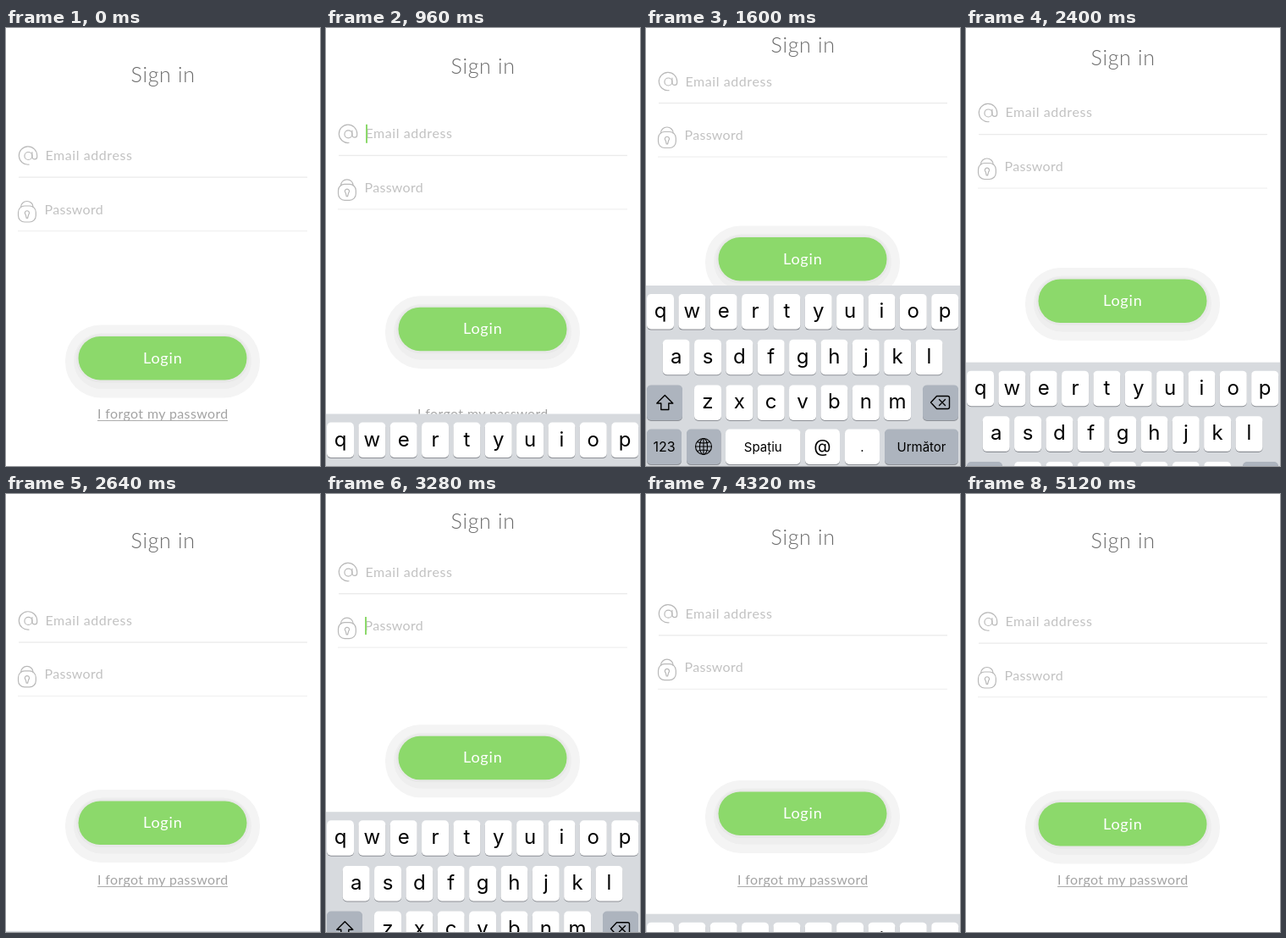
These frames come from a looping animation (371 by 517 pixels, 6000 ms). An HTML page:

```html
<!DOCTYPE html>
<html lang="en">
<head>
<meta charset="utf-8">
<title>Sign in</title>
<style>
  html, body { margin: 0; width: 100%; height: 100%; overflow: hidden; background: #fff; }
  svg { display: block; width: 371px; height: 517px; }
  text { font-family: Lato, "Open Sans", sans-serif; }
  .title { font-size: 25px; font-weight: 300; letter-spacing: .7px; fill: #6c6c6c; }
  .field text { font-size: 16px; fill: #c2c2c2; }
  .email { letter-spacing: .57px; }
  .password { letter-spacing: .3px; }
  .icon { fill: none; stroke: #b9b9b9; stroke-width: 1.2; stroke-linecap: round; }
  .caret { fill: #8cd96b; }
  .login { font-size: 18px; letter-spacing: .8px; fill: #fff; }
  .link { font-size: 16px; letter-spacing: .37px; fill: #a3a3a3; }
  #keyboard text { font-family: Inter, Roboto, sans-serif; text-anchor: middle; fill: #000; }
  #keyboard .letter { font-size: 24px; }
  #keyboard .label { font-size: 15px; }
  #keyboard .digits { font-size: 16px; }
  #keyboard .at { font-size: 21px; }
  #keyboard .light { fill: #fff; }
  .glyph { fill: none; stroke: #000; stroke-width: 1.4; stroke-linejoin: round; stroke-linecap: round; }
  .thin { stroke-width: 1.1; }
</style>
</head>
<body>
<svg viewBox="0 0 371 517">
  <text class="link" x="108" y="461">I forgot my password</text>
  <rect x="108" y="463" width="154" height="1" fill="#adadad"/>

  <g id="title"><text class="title" x="147.5" y="64">Sign in</text></g>

  <g id="fields" class="field">
    <g class="icon">
      <circle cx="26.4" cy="151" r="4.5"/>
      <path d="M30.9 146.700v5.300a2.900 2.900 0 0 0 5.800 0v-1.500A10.700 10.700 0 1 0 27 161.200"/>
      <path d="M17.500 211.500a7.300 7 0 0 1 14.600 0"/>
      <rect x="14.500" y="210" width="20.800" height="19" rx="7.500"/>
      <path d="M23.200 220.300a2.600 2.600 0 1 1 3.400 0l-1 4h-1.400z"/>
    </g>
    <text class="email" x="46.500" y="156">Email address</text>
    <rect x="15" y="175.500" width="341" height="1.300" fill="#ebebeb"/>
    <text class="password" x="45.500" y="219.500">Password</text>
    <rect x="14" y="239" width="342" height="1.200" fill="#f0f0f0"/>
    <rect id="emailCaret" class="caret" x="47" y="139.500" width="2" height="22"/>
    <rect id="passCaret" class="caret" x="46" y="203.500" width="2" height="21"/>
  </g>

  <g id="button">
    <rect x="70" y="350.500" width="230" height="86" rx="42" fill="#f4f4f4"/>
    <rect x="80" y="360" width="210" height="66" rx="33" fill="#eee"/>
    <rect x="83" y="362" width="204" height="56.500" rx="28" fill="#e8e8e8"/>
    <rect x="85.500" y="364" width="199" height="51.500" rx="25.700" fill="#8cd96b"/>
    <text class="login" x="162" y="395.500">Login</text>
  </g>

  <g id="keyboard">
    <rect width="371" height="215" fill="#d7dade"/>
  </g>
</svg>
<script>
const LOOP = 6000, STEP = 80;
const WHITE = '#fff', GREY = '#adb4be', BLUE = '#2688ff';
const ROWS = [10, 63.7, 117.4, 169.5], PITCH = 37.35;
const $ = id => document.getElementById(id);

function add(parent, tag, attrs, text) {
  const el = document.createElementNS('http://www.w3.org/2000/svg', tag);
  for (const name in attrs) el.setAttribute(name, attrs[name]);
  if (text) el.textContent = text;
  return parent.appendChild(el);
}

function addKey(parent, x, row, width, fill, text, style, drop) {
  const y = ROWS[row], box = { x, width, height: 41.5, rx: 5 };
  add(parent, 'rect', { ...box, y: y + 1.1, fill: '#8d9096' });
  add(parent, 'rect', { ...box, y, fill });
  if (text) add(parent, 'text', { x: x + width / 2, y: y + drop, class: style }, text);
}

const board = $('keyboard');
[['qwertyuiop', 1], ['asdfghjkl', 19.7], ['zxcvbnm', 57]].forEach(([letters, x], row) => {
  [...letters].forEach((c, i) => addKey(board, x + i * PITCH, row, 32, WHITE, c, 'letter', 28));
});
addKey(board, 1, 2, 42, GREY);
addKey(board, 327, 2, 42, GREY);
addKey(board, 1, 3, 41, GREY, '123', 'digits', 26.5);
addKey(board, 48, 3, 40.5, GREY);

const nextKeys = add(board, 'g', {});
addKey(nextKeys, 94, 3, 88.5, WHITE, 'Spațiu', 'label', 26);
addKey(nextKeys, 188, 3, 41, WHITE, '@', 'at', 27.5);
addKey(nextKeys, 235, 3, 41, WHITE, '.', 'label', 26);
addKey(nextKeys, 282, 3, 87, GREY, 'Următor', 'label', 26);

const doneKeys = add(board, 'g', {});
addKey(doneKeys, 94, 3, 182, WHITE, 'Spațiu', 'label', 26);
addKey(doneKeys, 282, 3, 87, BLUE, 'Acces', 'label light', 26);

// shift, backspace, globe
[
  'M22.3 129.500l-9.500 9.500h5v7.500h9v-7.500h5z',
  'M343.5 130.500h13a2 2 0 0 1 2 2v11a2 2 0 0 1-2 2h-13l-7-7.500zM346.5 134.500l7 7m0-7l-7 7'
].forEach(d => add(board, 'path', { d, class: 'glyph' }));
const globe = add(board, 'g', { class: 'glyph thin', transform: 'translate(68 190)' });
add(globe, 'circle', { r: 9.5 });
add(globe, 'ellipse', { rx: 4.6, ry: 9.5 });
add(globe, 'path', { d: 'M-9.5 0h19M0-9.5v19M-7.5-5.5q7.5 3 15 0M-7.5 5.5q7.5-3 15 0' });

// critically damped spring, 0 to 1
function spring(ms, rate) {
  const x = Math.max(0, ms) * rate;
  const rest = (1 + x) * Math.exp(-x);
  return rest < .002 ? 1 : 1 - rest;
}
const rise = ms => spring(ms, .0135);
const fall = ms => 1 - spring(ms, .0206);

function openness(t) {
  if (t < 2330) return rise(t - 880);
  if (t < 3110) return fall(t - 2330);
  if (t < 4135) return rise(t - 3110);
  return fall(t - 4135);
}

const ramp = (t, start) => Math.min(1, Math.max(0, (t - start) / 240));
const emailCaret = t => t < 960 || t >= 2400 ? 0 : t < 1800 ? 1 - ramp(t, 1360) : ramp(t, 1840);
const passCaret = t => t < 3120 ? 0 : 1 - ramp(t, 3680);

function shift(id, y) {
  $(id).setAttribute('transform', `translate(0 ${y.toFixed(2)})`);
}

function draw(now) {
  const t = Math.floor(now % LOOP / STEP) * STEP;
  const p = openness(t);
  shift('title', -35 * p);
  shift('fields', -87.5 * p);
  shift('button', -117 * p);
  shift('keyboard', 518.5 - 214.5 * p);
  $('emailCaret').setAttribute('opacity', emailCaret(t));
  $('passCaret').setAttribute('opacity', passCaret(t));
  const done = t >= 3000;
  nextKeys.setAttribute('visibility', done ? 'hidden' : 'visible');
  doneKeys.setAttribute('visibility', done ? 'visible' : 'hidden');
}

const start = performance.now();
function tick() {
  draw(performance.now() - start);
  requestAnimationFrame(tick);
}
tick();
</script>
</body>
</html>
```
